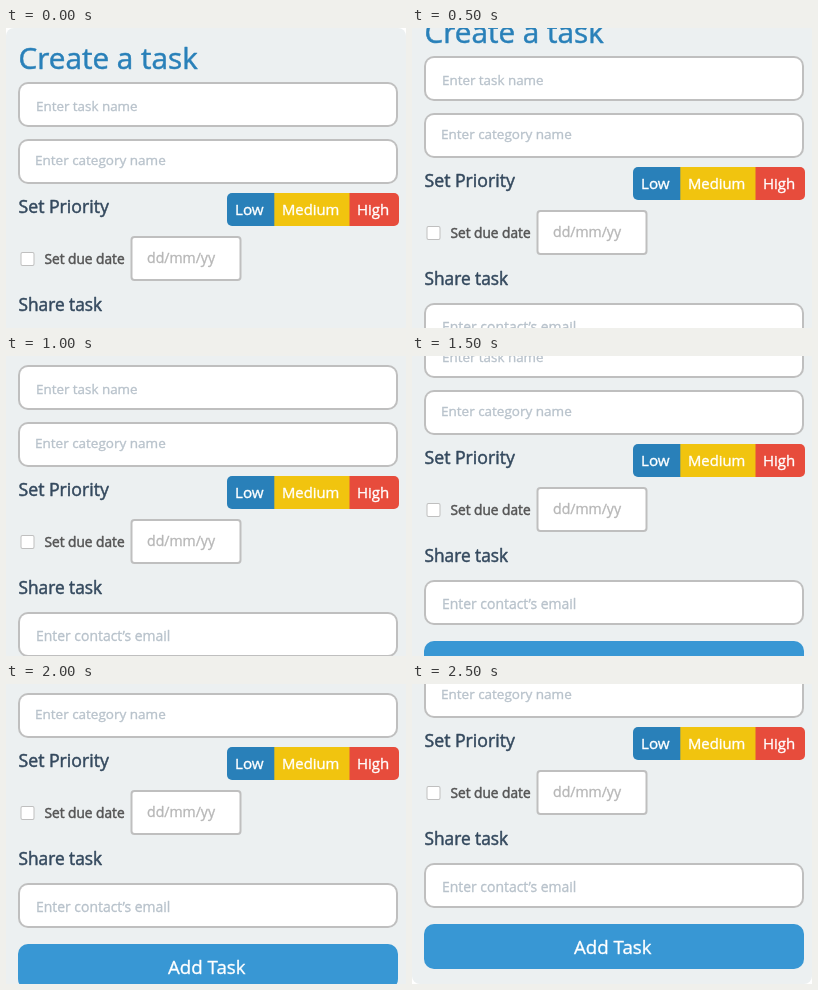
These frames come from a looping animation (400x300 px, 3000 ms). An HTML page with a canvas:

```html
<!DOCTYPE html>
<html lang="en">
<head>
<meta charset="utf-8">
<title>Create a task</title>
<style>
  html, body { margin: 0; width: 100%; height: 100%; overflow: hidden; background: #fff; }
  canvas { display: block; }
</style>
</head>
<body>
<canvas id="stage" width="400" height="300"></canvas>
<script>
const ctx = document.getElementById('stage').getContext('2d');

const STEP = 500;
const SCROLL = [0, 26, 45, 77, 102, 122];
const BLUE = '#2980b9';
const NAVY = '#34495e';
const HINT = '#b8c2cb';
const BORDER = '#bfbfbf';

function box(x, y, w, h, radius, fill) {
  ctx.beginPath();
  ctx.roundRect(x, y, w, h, radius);
  ctx.fillStyle = fill;
  ctx.fill();
}

function outlined(x, y, w, h, radius, line = 2) {
  box(x, y, w, h, radius, BORDER);
  box(x + line, y + line, w - 2 * line, h - 2 * line, Math.max(radius - line, 0), '#fff');
}

// A thin outline gives the letters a medium weight.
function label(text, x, baseline, size, color, thicken = 0.35) {
  ctx.font = `${size}px "Trebuchet MS", "Open Sans", sans-serif`;
  ctx.fillStyle = ctx.strokeStyle = color;
  ctx.lineWidth = thicken;
  ctx.lineJoin = 'round';
  ctx.fillText(text, x, baseline);
  ctx.strokeText(text, x, baseline);
}

function field(y, hint, x, baseline, size) {
  outlined(12, y, 380, 45, 10);
  label(hint, x, baseline, size, HINT);
}

function priorities() {
  box(221, 165, 48, 33, [5, 0, 0, 5], BLUE);
  box(343, 165, 50, 33, [0, 5, 5, 0], '#e74c3c');
  box(268.3, 165, 75.2, 33, 0, '#f1c40f');
  label('Low', 229, 187, 15.2, '#fff');
  label('Medium', 276, 187, 14.8, '#fff');
  label('High', 351, 187, 15, '#fff');
}

function form() {
  box(0, 0, 400, 422, 8, '#ecf0f1');
  label('Create a task', 12.5, 41, 29.7, BLUE, 0.5);
  field(54, 'Enter task name', 30, 83, 13.4);
  field(111, 'Enter category name', 29, 137, 13.5);
  label('Set Priority', 12.5, 185, 17.7, NAVY, 0.5);
  priorities();
  outlined(14.5, 224, 14, 14, 2, 1);
  label('Set due date', 38.5, 236, 13.7, '#555', 0.5);
  outlined(124.5, 208, 111, 45, 4);
  label('dd/mm/yy', 141, 235, 14.1, '#b7b7b7');
  label('Share task', 12.5, 283, 17.3, NAVY, 0.5);
  field(301, 'Enter contact’s email', 30, 330, 13.95);
  box(12, 362, 380, 45, 10, '#3897d4');
  label('Add Task', 162, 392, 18.7, '#fff');
}

function frame() {
  const step = Math.floor(performance.now() / STEP) % SCROLL.length;
  ctx.clearRect(0, 0, 400, 300);
  ctx.save();
  ctx.translate(0, -SCROLL[step]);
  form();
  ctx.restore();
  requestAnimationFrame(frame);
}

frame();
</script>
</body>
</html>
```
